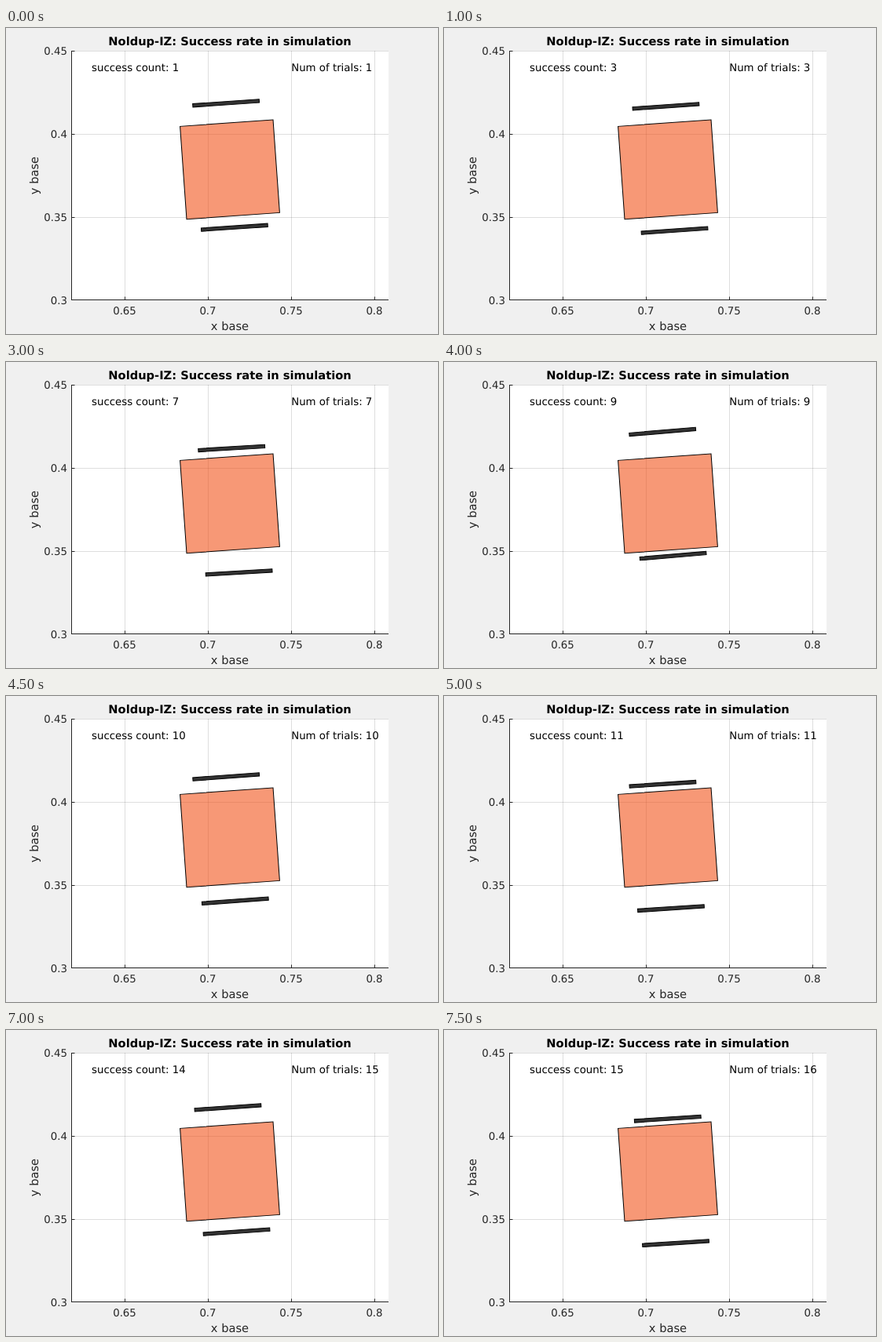
These frames come from a looping animation (550 px wide and 390 px high, 8000 ms). An HTML page:

```html
<!DOCTYPE html>
<html lang="en">
<head>
<meta charset="utf-8">
<title>Success rate in simulation</title>
<style>
  html, body { margin: 0; width: 100%; height: 100%; overflow: hidden; background: #f0f0f0; }
  svg { display: block; width: 550px; height: 390px; }
  text {
    font: 13.33px "DejaVu Sans", sans-serif;
    fill: #262626;
    text-rendering: geometricPrecision;
  }
  .label { font-size: 14.67px; text-anchor: middle; }
  .title { font-weight: bold; fill: #000; }
  .count { fill: #000; }
  .grid { stroke: #262626; stroke-opacity: .15; }
  .axis { stroke: #262626; fill: none; }
  .block { fill: rgb(242, 84, 27); fill-opacity: .6; stroke: #000; }
  .finger { fill: #333; stroke: #000; }
</style>
</head>
<body>
<svg viewBox="0 0 550 390">
  <rect x="83" y="29" width="404" height="318" fill="#fff"/>
  <g id="axes"></g>
  <rect class="block" x="-59.35" y="-59.35" width="118.7" height="118.7"
        transform="translate(285 180.4) rotate(-4.05)"/>
  <g id="gripper" class="finger">
    <rect x="-42.4" y="-81.5" width="84.8" height="4.3"/>
    <rect x="-42.4" y="77.2" width="84.8" height="4.3"/>
  </g>
  <path class="axis" d="M83.5 29V346.5H487"/>
  <text class="label title" x="285" y="22">Noldup-IZ: Success rate in simulation</text>
  <text class="label" x="285" y="385">x base</text>
  <text class="label" transform="translate(40.5 188) rotate(-90)">y base</text>
  <text class="count" id="wins" x="109" y="55"></text>
  <text class="count" id="trials" x="363.2" y="55"></text>
</svg>
<script>
const STEP = 500;
const FAILED = 11; // index of the trial that does not succeed

// Gripper pose per trial: centre x, centre y, tilt in degrees
const poses = [
  [285.5, 175, 3.9],
  [287.5, 182, 4.2],
  [288, 179, 4],
  [287, 183, 4.3],
  [287.4, 179.8, 4.6],
  [289, 185.2, 4],
  [291.9, 189.2, 3.4],
  [288, 180, 4.1],
  [284.9, 168, 4.85],
  [286, 182.1, 4.2],
  [283.7, 191.5, 3.8],
  [288, 198, 4],
  [296.5, 179.6, 4.15],
  [289, 177, 4.1],
  [288, 178, 4],
  [289.9, 192.4, 3.7]
];

const byId = id => document.getElementById(id);
const axes = byId('axes');

function add(tag, attrs, text = '') {
  const node = document.createElementNS('http://www.w3.org/2000/svg', tag);
  for (const key in attrs) node.setAttribute(key, attrs[key]);
  node.textContent = text;
  axes.append(node);
}

['0.65', '0.7', '0.75', '0.8'].forEach((label, i) => {
  const x = 151.5 + 106 * i;
  add('path', { class: 'grid', d: `M${x} 29V347` });
  add('path', { class: 'axis', d: `M${x} 347v-4.5` });
  add('text', { x: x - .5, y: 365, 'text-anchor': 'middle' }, label);
});

['0.45', '0.4', '0.35', '0.3'].forEach((label, i) => {
  const y = Math.min(29.5 + 106 * i, 346.5);
  add('path', { class: 'grid', d: `M84 ${y}H487` });
  add('path', { class: 'axis', d: `M83 ${y}h4.5` });
  add('text', { x: 78, y: 34 + 106 * i, 'text-anchor': 'end' }, label);
});

let shown = -1;

function draw() {
  const i = Math.floor(performance.now() / STEP) % poses.length;
  if (i !== shown) {
    shown = i;
    const [x, y, tilt] = poses[i];
    byId('gripper').setAttribute('transform', `translate(${x} ${y}) rotate(${-tilt})`);
    byId('wins').textContent = `success count: ${i + (i < FAILED ? 1 : 0)}`;
    byId('trials').textContent = `Num of trials: ${i + 1}`;
  }
  requestAnimationFrame(draw);
}

draw();
</script>
</body>
</html>
```
